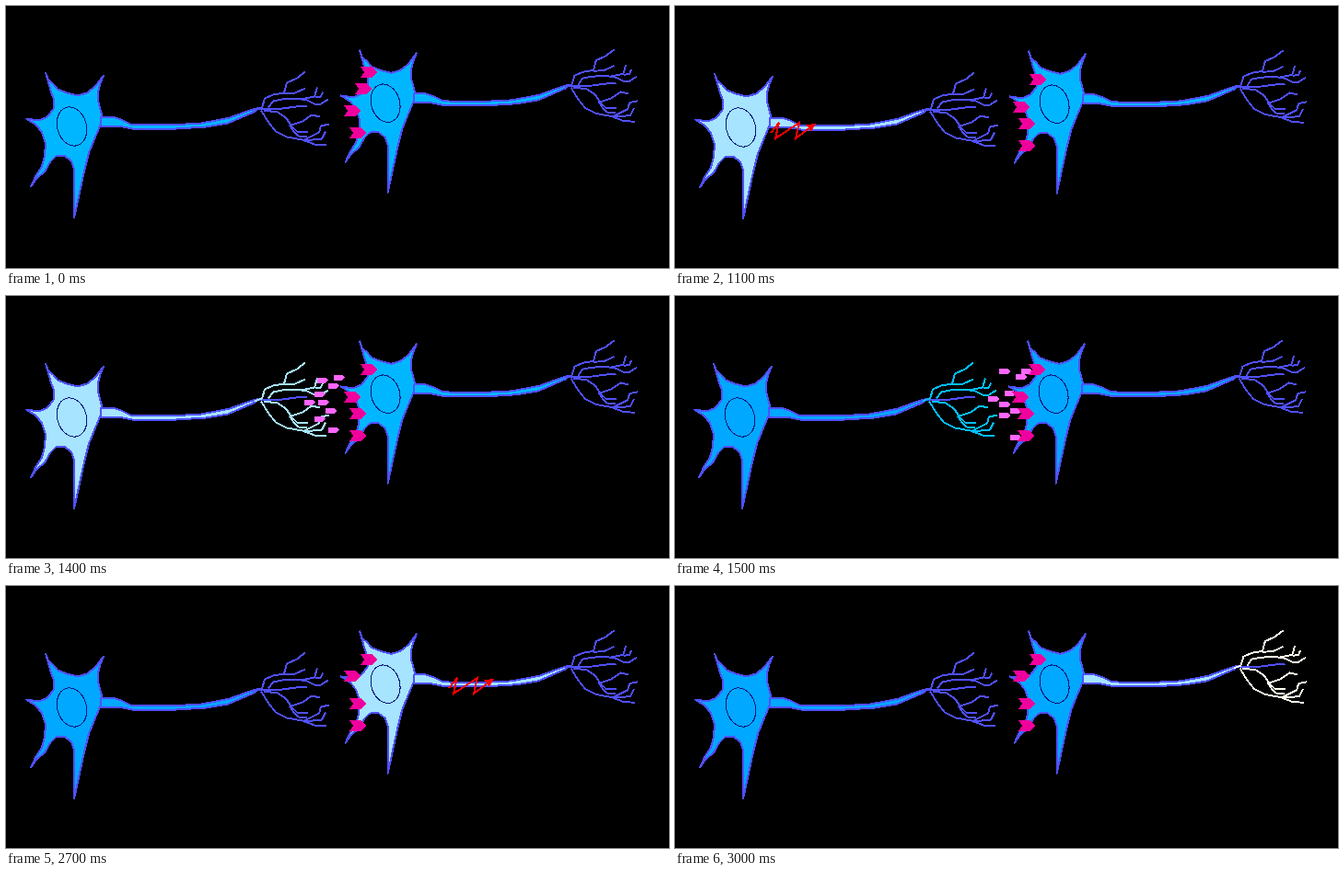
Write an HTML page that moves like this. It is 720 px wide and 285 px high and loops after 3.1 s.

```html
<!DOCTYPE html>
<html lang="en">
<head>
<meta charset="utf-8">
<title>Nerve impulse</title>
<style>
  html, body { margin: 0; width: 100%; height: 100%; overflow: hidden; background: #000; }
  svg { display: block; width: 100%; height: 100%; shape-rendering: crispEdges; }
  .neuron { stroke-width: 2; stroke: #5050ff; stroke-linejoin: round; }
  .soma { fill: var(--soma); stroke: var(--edge); }
  .axon { fill: var(--axon); }
  .branches { fill: none; stroke: var(--tips); }
  .core { fill: none; stroke: #0a1482; stroke-width: 1.1; }
  .stem { fill: none; }
  .receptor { fill: #f0009c; }
  .packet { fill: #ff66ff; }
  #bolt { stroke: #f00; fill: none; stroke-width: 2; }
</style>
</head>
<body>
<svg viewBox="0 0 720 285">
  <defs>
    <g id="neuron" class="neuron">
      <path class="soma" d="M43 73L46 81 51 85 56 91 66 95 78 98 88 95 97 88 106 76 102 86 100 94 100 104 103 115 105 123 102 131 97 143 90 160 85 180 80 203 76 222 74 231V178L71 169 63 163 54 164 48 170 42 181 34 187 27 197 32 186 39 175 42 164 43 150 39 138 33 130 22 123 36 125 45 121 52 112 52 102 49 94Z"/>
      <path class="axon" d="M103 121L116 121 125 124 135 129 165 130 195 129 212 128 228 125 243 122 262 115 275 111 271 115 257 121 241 128 217 132 185 134 137 134 122 131 103 131Z"/>
      <ellipse class="core" cx="71.500" cy="131.500" rx="15.800" ry="21.500" transform="rotate(-16 71.500 131.500)"/>
      <path class="stem" d="M275 112L300 112 315 110 327 109"/>
      <path class="branches" d="M270 114L278 111 281 101 290 97 302 95 305 84 316 79 325 72
        M302 96L314 95 325 90
        M285 111L290 104 300 102 315 101 327 103 335 107 342 107 350 102
        M320 102L335 99 338 89M336 100L342 99 344 94
        M277 114L285 127 293 137 305 143 322 146 335 151 348 152
        M280 114L295 116 304 122 310 131 316 137 328 137
        M308 130L313 138 318 142 327 142
        M310 130L322 126 332 119 341 121
        M324 146L340 138 342 131 351 129
        M323 147L343 145 347 137"/>
    </g>
    <path id="receptor" class="receptor" d="M-9-6H4L9 0 4 6H-9L-5 0Z"/>
    <path id="packet" class="packet" d="M-6-3H3L6 0 3 3H-6Z"/>
  </defs>
  <g id="stage">
    <use id="left" href="#neuron" transform="translate(0 .5)"/>
    <use id="right" href="#neuron" transform="matrix(.98 0 0 .982 342 -22.400)"/>
    <g id="packets"></g>
    <g id="receptors"></g>
    <g id="bolt">
      <path d="M53 137L62 126 58 143 84 126 80 143 96 131"/>
      <path d="M102 127L91 128 97 136Z" fill="#f00" stroke="none"/>
    </g>
  </g>
</svg>
<script>
const LOOP = 3100;
const byId = id => document.getElementById(id);
const BLUE = '#00b7ff', DEEP = '#00a8ff', PALE = '#a6e4ff', PURPLE = '#5050ff';

const cell = (soma, axon = soma, tips = PURPLE, edge = PURPLE) => ({ soma, axon, tips, edge });
const rest = cell(BLUE), calm = cell(DEEP);

const docked = {
  start: [[394, 73], [388, 91], [376, 115], [382, 139]],
  open: [[394, 80], [376, 110], [382, 128], [382, 152]],
  after: [[394, 80], [376, 98], [382, 128], [382, 152]]
};

// Each packet: release point, then landing point.
const routes = [
  [341, 95, 383, 82], [329, 101, 359, 82], [335, 107, 377, 88],
  [317, 107, 365, 106], [330, 113, 359, 118], [312, 119, 347, 112],
  [335, 125, 371, 125], [323, 137, 359, 130], [341, 137, 371, 154]
];

// The picture changes in hard steps; `travel` is packet progress across the gap.
const steps = [
  { at: 0, left: rest, right: rest, sites: 'start', shift: [0, -1] },
  { at: 1000, left: cell(PALE, BLUE), right: rest, bolt: [0, 0] },
  { at: 1100, left: cell(PALE), right: rest, bolt: [51, 1] },
  { at: 1200, left: cell(PALE), right: rest, bolt: [102, -2] },
  { at: 1300, left: cell(PALE, PALE, PALE), right: rest, bolt: [152, -9], travel: 0 },
  { at: 1400, left: cell(PALE, PALE, PALE), right: rest, travel: .5 },
  { at: 1500, left: cell(DEEP, DEEP, '#00bfff'), right: calm, travel: 1, shift: [-1, 0] },
  { at: 2600, left: calm, right: cell(PALE, DEEP), bolt: [349.5, -28], travel: 1 },
  { at: 2700, left: calm, right: cell(PALE), bolt: [428, -26], sites: 'after' },
  { at: 2800, left: calm, right: cell(BLUE, PALE, PURPLE, BLUE), bolt: [507, -39], sites: 'after', shift: [1, 0] },
  { at: 2900, left: calm, right: cell(DEEP, PALE, PALE), sites: 'after' },
  { at: 3000, left: calm, right: cell(DEEP, PALE, '#fffff0'), sites: 'after' }
];

const spawn = (parent, shape, count) => Array.from({ length: count }, () => {
  const node = document.createElementNS('http://www.w3.org/2000/svg', 'use');
  node.setAttribute('href', '#' + shape);
  return byId(parent).appendChild(node);
});
const packets = spawn('packets', 'packet', routes.length);
const receptors = spawn('receptors', 'receptor', 4);

const move = (node, x, y) => node.setAttribute('transform', `translate(${x} ${y})`);
const show = (node, on) => node.setAttribute('visibility', on ? 'visible' : 'hidden');
const paint = (id, colours) => {
  for (const part in colours) byId(id).style.setProperty('--' + part, colours[part]);
};

function render({ left, right, bolt, travel, sites = 'open', shift = [0, 0] }) {
  move(byId('stage'), ...shift);
  paint('left', left);
  paint('right', right);
  show(byId('bolt'), bolt);
  if (bolt) move(byId('bolt'), ...bolt);
  receptors.forEach((node, i) => move(node, ...docked[sites][i]));
  show(byId('packets'), travel !== undefined);
  if (travel !== undefined) packets.forEach((node, i) => {
    const [x0, y0, x1, y1] = routes[i];
    move(node, x0 + (x1 - x0) * travel, y0 + (y1 - y0) * travel);
  });
}

let current;
function tick() {
  const time = performance.now() % LOOP;
  const step = steps.findLast(s => s.at <= time);
  if (step !== current) render(current = step);
  requestAnimationFrame(tick);
}
tick();
</script>
</body>
</html>
```
